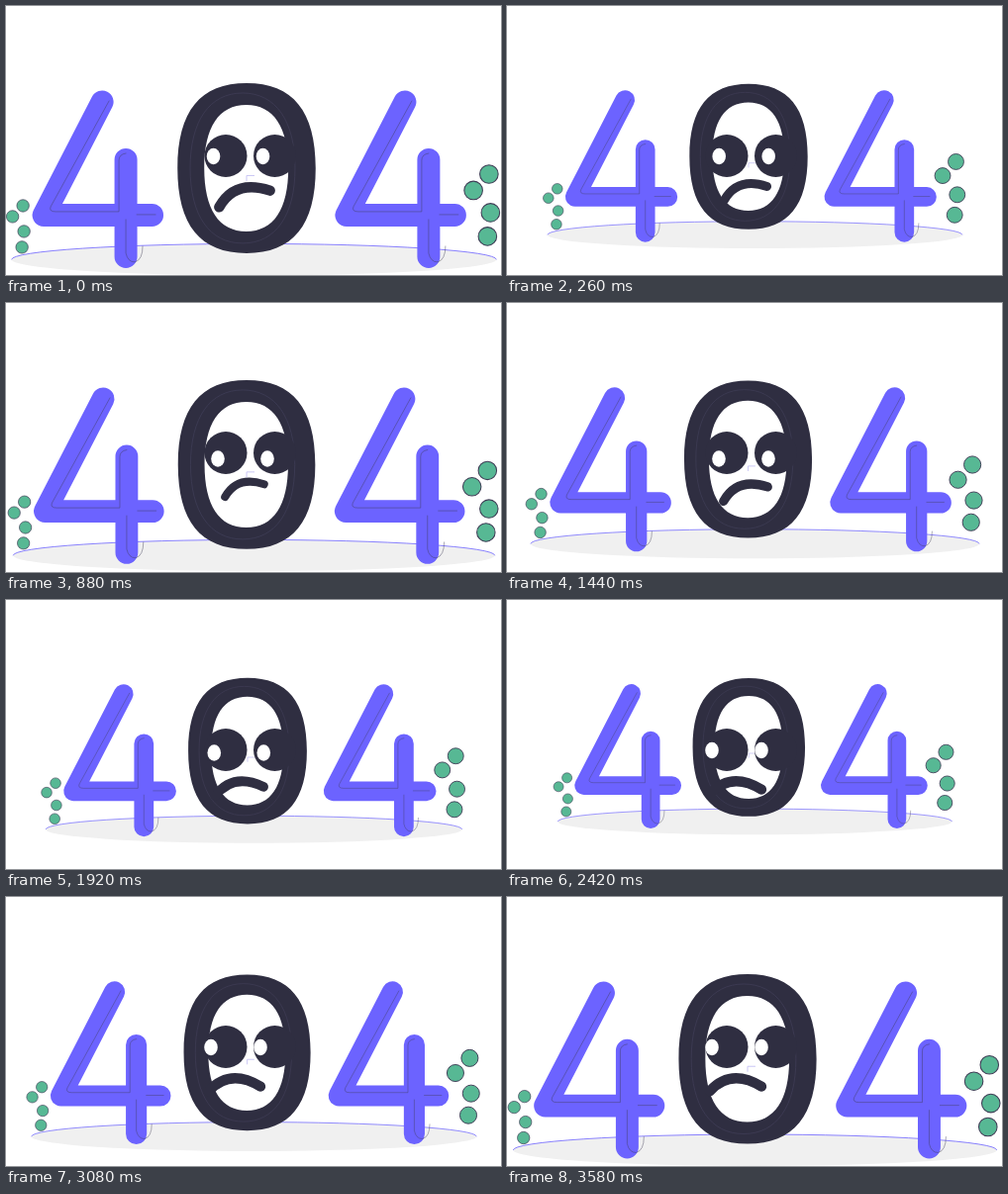
Write an HTML page that moves like this. It is 500x272 px and loops after 3.6 s.

```html
<!DOCTYPE html>
<html lang="en">
<head>
<meta charset="utf-8">
<title>404</title>
<style>
  html, body { margin: 0; width: 100%; height: 100%; overflow: hidden; background: #fff; }
  svg { display: block; width: 100%; height: 100%; }
  .line { fill: none; stroke: #3f3d56; stroke-width: .8; }
</style>
</head>
<body>
<svg viewBox="0 0 500 272">
  <defs>
    <g id="four" stroke-linecap="round" stroke-linejoin="round">
      <path d="M97 97L38 211.500H147.500M121 155.500V253.500" fill="none" stroke="#6c63ff" stroke-width="23"/>
      <path class="line" opacity=".55" d="M104 96L45 203Q43 208 50 208H114V156Q114 150 121 149M121 216V250Q123 259 130 259Q138 257 138 243M132 211H151"/>
    </g>
    <g id="dots" fill="#57b894" stroke="#3f3d56" stroke-width=".7">
      <circle r="6.200"/>
      <circle cx="-10.500" cy="11" r="6.200"/>
      <circle cx="1" cy="26" r="6.200"/>
      <circle cx="-1" cy="42" r="6.200"/>
    </g>
  </defs>
  <g id="scene">
    <ellipse cx="250.500" cy="256.500" rx="245" ry="16" fill="#f0f0f0"/>
    <path d="M5.500 256.500A245 16 0 0 1 495.500 256.500" fill="none" stroke="#6c63ff" opacity=".8"/>
    <use href="#four"/>
    <use href="#four" x="306"/>
    <path id="zero" fill="#2f2e41" fill-rule="evenodd"/>
    <path id="rim" class="line"/>
    <path d="M243 177V171.500H251" fill="none" stroke="#c9c6f5"/>
    <use href="#dots" transform="translate(17 202)"/>
    <use href="#dots" transform="translate(488 170) scale(1.5)"/>
  </g>
  <g fill="#2f2e41">
    <circle cx="222" cy="151.500" r="21.500"/>
    <circle cx="271.500" cy="151.500" r="21.500"/>
  </g>
  <g id="pupils" fill="#fff">
    <ellipse rx="6.800" ry="8.200"/>
    <ellipse cx="50" rx="6.800" ry="8.200"/>
  </g>
  <path id="mouth" d="M-27 0Q-3 -22 27 0" fill="none" stroke="#2f2e41" stroke-width="10.500" stroke-linecap="round"/>
</svg>
<script>
const LOOP = 3600;
const $ = id => document.getElementById(id);
const place = (id, transform) => $(id).setAttribute('transform', transform);

// Squarish oval; k sets how full the corners are
function oval(cx, cy, rx, ry, k) {
  const p = (x, y) => `${cx + x * rx} ${cy + y * ry} `;
  return `M${p(0, -1)}C${p(k, -1)}${p(1, -k)}${p(1, 0)}C${p(1, k)}${p(k, 1)}${p(0, 1)}` +
    `C${p(-k, 1)}${p(-1, k)}${p(-1, 0)}C${p(-1, -k)}${p(-k, -1)}${p(0, -1)}Z`;
}
$('zero').setAttribute('d', oval(243, 164, 69.8, 86, .67) + oval(242.7, 164, 42.5, 64, .65));
$('rim').setAttribute('d', oval(239, 164, 53, 76, .63));

// Linear rise from 0 to 1 between two times
const ramp = (t, from, to) => Math.min(1, Math.max(0, (t - from) / (to - from)));
// Rise to 1 at mid and back to 0
const bump = (t, from, mid, to) => ramp(t, from, mid) - ramp(t, mid, to);

function draw(t) {
  // A quick shrink, then a slow one
  const zoom = 1 - .2 * (bump(t, 0, 360, 900) + bump(t, 900, 2340, LOOP));
  place('scene', `translate(250 83.5) scale(${zoom}) translate(-250 -83.5)`);

  // The gaze goes right, down, then back up to the left
  const right = ramp(t, 0, 500), down = ramp(t, 500, 880), left = ramp(t, 1440, 2340);
  const drop = 5.5 * (down - left);
  place('pupils', `translate(${209.5 + 9 * right - 4.5 * down - 7 * left} ${152 + drop})`);

  const size = 1 - .3 * right + .17 * ramp(t, 500, 1440) + .1 * left;
  const y = 195 - 35 * (1 - size) + drop / 2;
  place('mouth', `translate(${241 - 10 * left} ${y}) rotate(${13 * left - 18}) scale(${size})`);
}

const start = performance.now();
function tick() {
  draw((performance.now() - start) % LOOP);
  requestAnimationFrame(tick);
}
tick();
</script>
</body>
</html>
```
